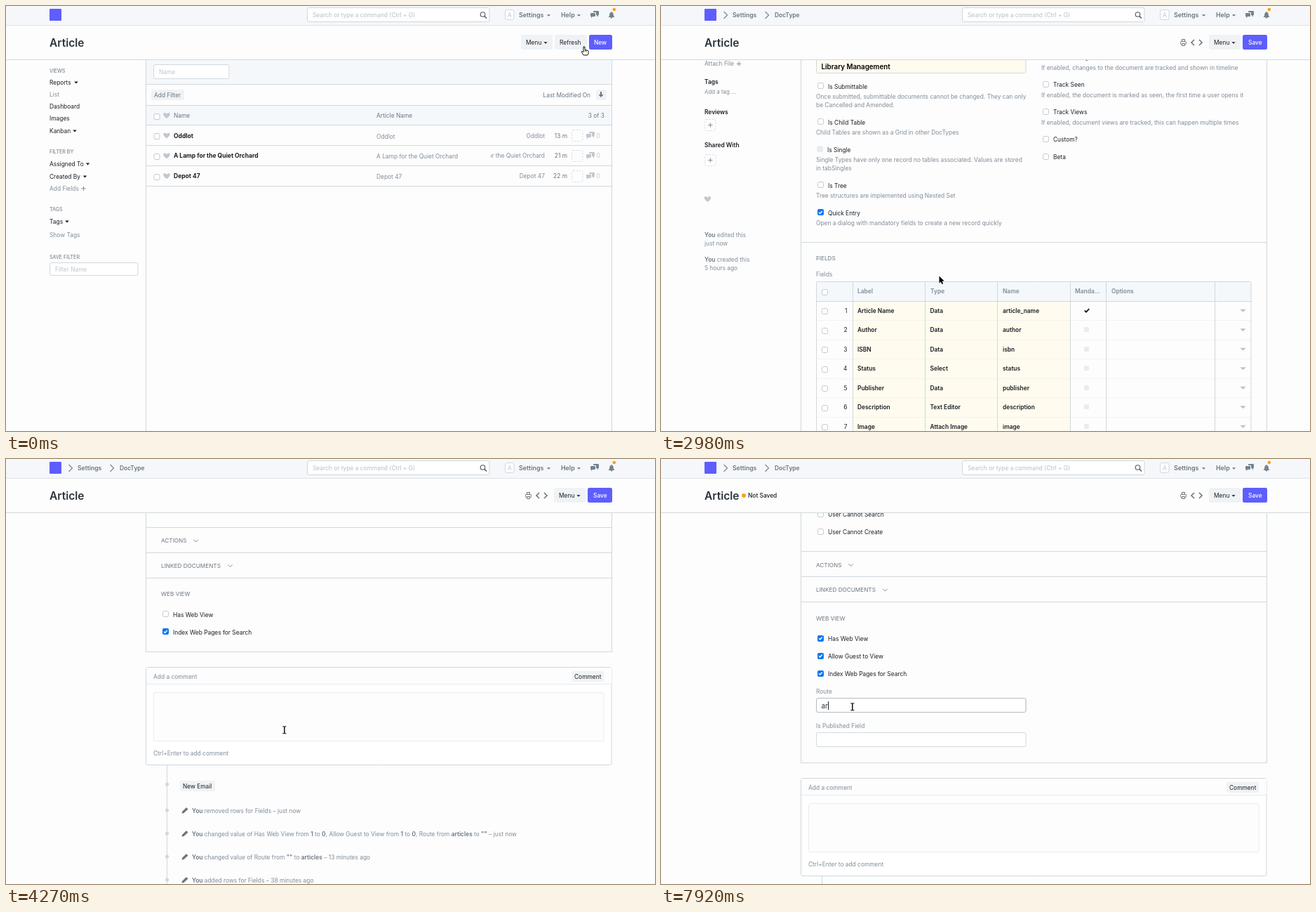
An HTML page with a canvas for the animation above (8000 ms loop, 925 px wide and 605 px high).

```html
<!DOCTYPE html>
<html lang="en">
<head>
<meta charset="utf-8">
<title>Article form</title>
<style>
html, body { margin: 0; width: 100%; height: 100%; overflow: hidden; background: #fdfdfd }
canvas { display: block; width: 925px; height: 605px }
</style>
</head>
<body>
<canvas id="stage" width="925" height="605"></canvas>
<script>
const g = document.getElementById('stage').getContext('2d');
const LOOP = 8000;
const DARK = '#1a1e23', MUTED = '#7f8c99', MID = '#6a7580', FAINT = '#bfc7ce', LINE = '#d1d8dd',
  PANEL = '#f5f8fb', BUTTON = '#eff3f6', PAGE = '#fdfdfd', BLUE = '#5e5eff', YELLOW = '#fffbef', ORANGE = '#ffa00a';
let oy = 0; // vertical offset of the layer being drawn

// ---- time ----
const bursts = [[120, 120, 1], [270, 960, 7], [1080, 1610, 6], [1940, 2270, 4], [2420, 2650, 3], [2890, 3690, 8],
  [3810, 4270, 5], [4620, 5330, 7], [5450, 5560, 2], [5920, 6270, 4], [6510, 6510, 1], [6750, 7220, 5],
  [7570, 7570, 1], [7800, 7920, 2]];
const ticks = [0];
for (const [a, b, n] of bursts)
  for (let i = 0; i < n; i++) ticks.push(Math.floor(a + (n > 1 ? (b - a) * i / (n - 1) : 0)));

const scrollKeys = [[2780, 0], [3000, 190], [3347, 655.5], [3575, 870], [3810, 1024], [4040, 1230], [4270, 1368.5],
  [4620, 1368.5], [4860, 1334]];
const pointerKeys = [[0, 824, 58], [119, 824, 58], [120, 776, 49], [500, 776, 49], [960, 700, 306], [1080, 700, 306],
  [1610, 511, 257], [2330, 511, 257], [2650, 396, 385], [4500, 396, 385], [5330, 260, 251], [5900, 260, 251],
  [6153, 285, 272], [6270, 282, 280], [6640, 282, 280], [6870, 287, 301], [7100, 272, 350], [7220, 272, 352]];

function at(keys, t) {
  const i = keys.findIndex(k => k[0] > t);
  if (i === 0) return keys[0].slice(1);
  if (i < 0) return keys[keys.length - 1].slice(1);
  const a = keys[i - 1], b = keys[i], u = (t - a[0]) / (b[0] - a[0]);
  return a.slice(1).map((v, j) => v + (b[j + 1] - v) * u);
}

// ---- drawing helpers; y of text is the middle of its capitals ----
function text(s, x, y, color = DARK, weight = 400, size = 8.4, align = 'left') {
  g.font = `${weight} ${size}px Inter, sans-serif`;
  g.textAlign = align;
  g.fillStyle = color;
  g.fillText(s, x, y + oy + size * .36);
  return g.measureText(s).width;
}
// Parts between asterisks are bold.
function rich(s, x, y) {
  s.split('*').forEach((part, i) => x += text(part, x, y, i % 2 ? MID : MUTED, i % 2 ? 600 : 400));
}
function fill(x1, y1, x2, y2, color, r = 0) {
  g.fillStyle = color;
  g.beginPath();
  g.roundRect(x1, Math.floor(y1 + oy), x2 - x1, Math.round(y2 - y1), r);
  g.fill();
}
function box(x1, y1, x2, y2, bg = '#fff', border = LINE, r = 2.5, dash = []) {
  g.beginPath();
  g.roundRect(x1 + .5, Math.floor(y1 + oy) + .5, x2 - x1 - .5, Math.round(y2 - y1), r);
  if (bg) { g.fillStyle = bg; g.fill(); }
  g.strokeStyle = border;
  g.lineWidth = 1;
  g.setLineDash(dash);
  g.stroke();
  g.setLineDash([]);
}
function hline(y, x1 = 199, x2 = 864, color = LINE) { fill(x1, y, x2, y + 1, color); }
function vline(x, y1, y2, color = LINE) { fill(x, y1, x + 1, y2, color); }
function path(points, x, y, stroke, width = 1.2, bg, close) {
  g.beginPath();
  for (let i = 0; i < points.length; i += 2) g.lineTo(x + points[i], y + oy + points[i + 1]);
  if (close) g.closePath();
  if (bg) { g.fillStyle = bg; g.fill(); }
  if (stroke) { g.strokeStyle = stroke; g.lineWidth = width; g.stroke(); }
}
function dot(x, y, r, color) {
  g.fillStyle = color;
  g.beginPath();
  g.arc(x, y + oy, r, 0, 7);
  g.fill();
}
const caret = (x, y, color = DARK, r = 3) => path([-r, -r / 2, r, -r / 2, 0, r / 2], x, y, null, 0, color);
const chevronDown = (x, y, color = MUTED) => path([-3.2, -1.6, 0, 1.6, 3.2, -1.6], x, y, color, 1);
const chevron = (x, y, h, dir, color, w) => path([-h / 2 * dir, -h, h / 2 * dir, 0, -h / 2 * dir, h], x, y, color, w);
const tick = (x, y, color = DARK, s = 1, w = 1.9) => path([-3.2 * s, 0, -1 * s, 2.2 * s, 3.2 * s, -2.4 * s], x, y, color, w);
function plus(x, y, color = MUTED) {
  path([-3.2, 0, 3.2, 0], x, y, color, 1);
  path([0, -3.2, 0, 3.2], x, y, color, 1);
}
function button(x1, y1, x2, y2, label, tx, color = DARK, bg = BUTTON, weight = 400) {
  fill(x1, y1, x2, y2, bg, 2.5);
  text(label, tx, (y1 + y2) / 2, color, weight);
}
function checkbox(x, y, on) {
  if (on) {
    fill(x - 4, y - 4, x + 5, y + 5, '#0b78f0', 2);
    tick(x + .4, y + .3, '#fff', .75, 1.3);
  } else box(x - 4, y - 4, x + 4.5, y + 4, '#fff', '#c4c9ce', 2);
}
function check(label, x, y, on) {
  checkbox(x + 6, y - 1, on);
  text(label, x + 17, y);
}
function section(label, y, chevX) {
  text(label, 221, y, MID, 400, 8.2);
  if (chevX) chevronDown(chevX, y);
}
function input(label, x, y, h = 20) { // y is the top edge
  text(label, x, y - 9.5, MUTED);
  box(x, y, x + 299, y + h);
}
function heart(x, y, color = '#c0c8d0') {
  y += oy;
  g.fillStyle = color;
  g.beginPath();
  g.moveTo(x, y + 4);
  g.bezierCurveTo(x - 9, y - 2, x - 3, y - 6.5, x, y - 2.2);
  g.bezierCurveTo(x + 3, y - 6.5, x + 9, y - 2, x, y + 4);
  g.fill();
}
function chat(x, y, color) {
  fill(x - 2, y - 5, x + 6, y + 1, color, 1);
  path([2, 0, 5, 0, 5, 3.5], x, y, null, 0, color);
  fill(x - 6, y - 3, x + 2, y + 3, PAGE, 1);
  fill(x - 6, y - 2, x + 1, y + 3, color, 1);
  path([-5, 2, -2, 2, -5, 5], x, y, null, 0, color);
}

// ---- shared chrome ----
function navbar(form) {
  fill(0, 0, 925, 27, '#f5f7fa');
  hline(27, 0, 925, '#dfe4e8');
  fill(62, 4, 79, 21, BLUE, 1);
  if (form) {
    chevron(92, 13, 5, 1, MUTED, 1.3);
    text('Settings', 102, 13, MID, 600, 8.6);
    chevron(151, 13, 5, 1, MUTED, 1.3);
    text('DocType', 162, 13, MID, 600);
  }
  box(429, 2, 689, 22);
  text('Search or type a command (Ctrl + G)', 437, 13, '#b6bfc8');
  g.strokeStyle = '#4f565d';
  g.lineWidth = 1.1;
  g.beginPath();
  g.arc(679.5, 12, 3.3, 0, 7);
  g.stroke();
  path([2, 2.5, 5, 5.5], 680, 12, '#4f565d', 1.5);
  box(711, 5, 724, 19);
  text('A', 718, 13, FAINT, 400, 8.4, 'center');
  text('Settings', 731, 13, MID, 600, 8.9);
  caret(773.5, 13.5, MID, 2.6);
  text('Help', 791, 13, MID, 600, 8.9);
  caret(816.5, 13.5, MID, 2.6);
  chat(839, 12, '#75828f');
  path([-4.5, 3, -3, 1, -2.7, -2, -1, -4.5, 1, -4.5, 2.7, -2, 3, 1, 4.5, 3], 863, 13, null, 0, '#75828f');
  dot(863, 16.3, 1.3, '#75828f');
  dot(866.8, 5, 2.3, ORANGE);
}
function pageHead(form, unsaved) {
  fill(0, 28, 925, 76, PAGE);
  hline(76, 0, 925);
  text('Article', 62, 52, '#2b333b', 600, 15.5);
  if (unsaved) {
    dot(118, 52, 2.9, ORANGE);
    text('Not Saved', 124, 52, DARK, 500);
  }
  const x = form ? 781 : 734;
  button(x, 41, x + 45, 62, 'Menu', x + 7);
  caret(x + 35, 52.5, DARK, 2.6);
  if (form) {
    box(740, 50, 748.5, 54, PAGE, MID, 1);
    box(742, 47, 746.5, 50, PAGE, MID, 0);
    box(742, 53, 746.5, 56, PAGE, MID, 0);
    chevron(758, 52, 4, -1, MID, 1.6);
    chevron(769, 52, 4, 1, MID, 1.6);
    button(829, 41, 864, 62, 'Save', 837, '#fff', BLUE, 500);
  } else {
    button(782, 41, 828, 62, 'Refresh', 789);
    button(831, 41, 864, 62, 'New', 838, '#fff', BLUE, 500);
  }
}

// ---- list page ----
const articles = [['Oddlot', '13 m'], ['A Lamp for the Quiet Orchard', '21 m'], ['Depot 47', '22 m']];
function listPage(menuOpen) {
  for (const [s, y] of [['VIEWS', 92], ['FILTER BY', 207.5], ['TAGS', 289.5], ['SAVE FILTER', 357]])
    text(s, 62, y, MID, 400, 7.1);
  for (const [s, y, cx] of [['Reports', 108.5, 100], ['Dashboard', 142.5], ['Images', 159.5], ['Kanban', 177.5, 98],
    ['Assigned To', 224.5, 116.5], ['Created By', 242.5, 112.5], ['Tags', 306.5, 87]]) {
    text(s, 62, y);
    if (cx) caret(cx, y + .5, DARK, 2.8);
  }
  for (const [s, y] of [['List', 126], ['Add Fields', 259.5], ['Show Tags', 325.5]]) text(s, 62, y, MUTED);
  plus(110.5, 259.8);
  box(62, 365, 188, 383);
  text('Filter Name', 70, 375, FAINT);

  fill(200, 77, 863, 111, PANEL);
  fill(200, 142, 863, 169, PANEL);
  vline(199, 77, 605);
  vline(863, 77, 605);
  [111, 141, 169, 198, 227, 256].forEach(y => hline(y));
  box(210, 83, 318, 103);
  text('Name', 218, 94, FAINT);
  button(207, 119, 254, 134, 'Add Filter', 211, MID);
  text('Last Modified On', 833, 127, MID, 400, 8.4, 'right');
  fill(841, 119, 856, 134, BUTTON, 2.5);
  path([0, -4, 0, 1], 848, 126, MID, 2);
  path([-3.5, 0, 3.5, 0, 0, 4], 848, 126, null, 0, MID);

  checkbox(214.5, 157);
  heart(229, 156);
  text('Name', 239, 156, MID);
  text('Article Name', 528, 156, MID);
  text('3 of 3', 853, 156, MID, 400, 8.4, 'right');
  articles.forEach(([name, age], i) => {
    const y = 184.5 + 28.8 * i;
    checkbox(214.5, y + 1);
    heart(229, y);
    text(name, 239, y, DARK, 700, 8.5);
    text(name, 528, y + 1, MUTED);
    g.save();
    g.beginPath();
    g.rect(691, y - 10, 80, 20);
    g.clip();
    text(name, 768, y, MUTED, 400, 8.4, 'right');
    g.restore();
    text(age, 800, y, MID, 400, 8.4, 'right');
    box(806, y - 8, 822, y + 8, null, LINE, 2.5, [2, 2]);
    chat(833, y, '#c0c8d0');
    text('0', 841.5, y, FAINT);
  });
  if (!menuOpen) return;
  g.save();
  g.shadowColor = 'rgba(0,0,0,.15)';
  g.shadowBlur = 5;
  g.shadowOffsetY = 2;
  box(637, 63, 779, 325);
  g.restore();
  ['Import', 'Add to Desktop', 'User Permissions', 'Role Permissions Manager', 'Customize', 'Toggle Sidebar',
    'Share URL', 'Edit DocType'].forEach((s, i) => text(s, 647, 80 + 32.6 * i));
}

// ---- form page ----
function formSidebar() {
  text('Comments', 62, 93);
  fill(173, 86, 188, 100, BUTTON, 7);
  text('0', 181, 93, DARK, 400, 8.4, 'center');
  for (const [s, y] of [['Assigned To', 118.5], ['Attachments', 160.5], ['Tags', 202.5], ['Reviews', 246], ['Shared With', 293]])
    text(s, 62, y, DARK, 600);
  text('Assign', 62, 135, MUTED);
  plus(95.5, 135.3);
  text('Attach File', 62, 177, MUTED);
  plus(111, 177.3);
  text('Add a tag ...', 62, 217, MUTED, 400, 7.9);
  for (const y of [256, 306]) {
    box(62, y, 78, y + 16, null, LINE, 2.5, [2, 2]);
    plus(70.3, y + 8.5);
  }
  heart(66.5, 370);
  rich('*You* edited this', 62, 421);
  rich('just now', 62, 433);
  rich('*You* created this', 62, 455.5);
  rich('5 hours ago', 62, 467.5);
}

function grid(cols, top, head, rowH, rows, bottom, yellowTo, rule) {
  const end = top + head + rowH * rows;
  fill(221, top, 842, top + head, PANEL);
  fill(273, top + head, yellowTo, end, YELLOW);
  for (let i = 1; i < rows; i++) hline(top + head + rowH * i, 221, 842, rule);
  hline(top + head, 221, 842);
  hline(end, 221, 842);
  cols.forEach(x => vline(x, top, end));
  box(221, top, 841, bottom, null, LINE, 1);
  checkbox(233, top + head / 2 + 1);
  for (let i = 0; i < rows; i++) {
    const y = top + head + rowH * (i + .5);
    checkbox(233, y + 1);
    text(i + 1, 265.5, y, DARK, 400, 8.4, 'right');
    caret(829.5, y, '#b9c1c9', 4);
  }
  button(232, bottom - 23, 275, bottom - 8, 'Add Row', 236);
}
function flag(x, y, on) {
  if (on) tick(x, y);
  else fill(x - 4, y - 3.5, x + 3, y + 3.5, '#e9ecef', 1.5);
}

function settingsBlock() {
  button(777, 83, 852, 98, 'Go to Article List', 781);
  section('DASHBOARD', 125, 285.5);
  text('Module', 221, 160.5, MUTED);
  box(221, 170, 520, 190, YELLOW);
  text('Library Management', 228.5, 181, '#000', 600, 9.8);
  const left = [['Is Submittable', 209.5, 'Once submitted, submittable documents cannot be changed. They can only', 'be Cancelled and Amended.'],
    ['Is Child Table', 260.5, 'Child Tables are shown as a Grid in other DocTypes'],
    ['Is Single', 299.5, 'Single Types have only one record no tables associated. Values are stored', 'in tabSingles'],
    ['Is Tree', 350.5, 'Tree structures are implemented using Nested Set'],
    ['Quick Entry', 389.5, 'Open a dialog with mandatory fields to create a new record quickly']];
  for (const [label, y, ...help] of left) {
    if (label === 'Is Single') {
      fill(222, y - 5, 231, y + 4, '#e9ecef', 2);
      text(label, 237, y);
    } else check(label, 221, y, label === 'Quick Entry');
    help.forEach((s, i) => text(s, 221, y + 14.8 + 12 * i, MUTED));
  }
  const right = [['Track Changes', 168, 'If enabled, changes to the document are tracked and shown in timeline'],
    ['Track Seen', 207, 'If enabled, the document is marked as seen, the first time a user opens it'],
    ['Track Views', 246, 'If enabled, document views are tracked, this can happen multiple times'],
    ['Custom?', 285, ''], ['Beta', 310, '']];
  right.forEach(([label, y, help], i) => {
    check(label, 542, y, i === 0);
    text(help, 542, y + 14.6, MUTED);
  });

  section('FIELDS', 454.5);
  text('Fields', 221, 477, MUTED);
  const fields = [['Article Name', 'Data', 'article_name'], ['Author', 'Data', 'author'], ['ISBN', 'Data', 'isbn'],
    ['Status', 'Select', 'status'], ['Publisher', 'Data', 'publisher'], ['Description', 'Text Editor', 'description'],
    ['Image', 'Attach Image', 'image']];
  grid([273, 376, 479, 583, 634, 789], 487, 28, 27.5, fields.length, 737, 583, '#f3f3ee');
  [['Label', 280], ['Type', 384], ['Name', 487], ['Manda...', 590], ['Options', 642]]
    .forEach(([s, x]) => text(s, x, 500.5, MUTED, 600));
  fields.forEach((row, i) => {
    const y = 528.5 + 27.5 * i;
    row.forEach((s, j) => text(s, 280 + 103.5 * j, y, DARK, 600));
    flag(607, y, i === 0);
  });
}

function namingBlock() {
  section('NAMING', 126.5);
  input('Auto Name', 221, 159);
  text('field:article_name', 228.5, 169.5, '#2b333b', 400, 9.8);
  text('Naming Options:', 221, 188, MUTED);
  ['1|*field:[fieldname]* - By Field', '2|*naming_series:* - By Naming Series (field called naming_series must', '|be present',
    '3|*Prompt* - Prompt user for a name', '4|*[series]* - Series by prefix (separated by a dot); for example', '|PRE.#####',
    '5|*format:EXAMPLE-{MM}morewords{fieldname1}-{fieldname2}-*', '|*{#####}* - Replace all braced words (fieldnames, date words (DD,',
    '|MM, YY), series) with their value. Outside braces, any characters', '|can be used.'].forEach((s, i) => {
    const [n, body] = s.split('|'), y = 200 + 12 * i;
    if (n) text(n + '.', 246.5, y, MUTED, 400, 8.4, 'right');
    rich(body, 249, y);
  });
  input('Name Case', 221, 341);
  chevronDown(508.5, 352, MID);
  input('Description', 542, 159, 104);
  input('Documentation Link', 542, 292);
  text('URL for documentation or help', 542, 322, MUTED);
  section('FORM SETTINGS', 402.5, 301);
  section('VIEW SETTINGS', 438.5, 298);
}

function permissionBlock() {
  section('EMAIL SETTINGS', 106, 302.5);
  section('PERMISSION RULES', 146);
  text('Permissions', 221, 168.5, MUTED);
  grid([273, 376, 479, 531, 583, 634, 686, 737, 789], 179, 27.5, 28.2, 3, 321, 376, LINE);
  text('Role', 280, 192, MUTED, 600);
  text('Level', 472, 192, MUTED, 600, 8.4, 'right');
  ['Read', 'Write', 'Create', 'Delete', 'Submit', 'Cancel']
    .forEach((s, i) => text(s, 505 + 51.6 * i, 192, MUTED, 600, 8.4, 'center'));
  [['System Manager', 4], ['Librarian', 4], ['Library Member', 1]].forEach(([role, granted], i) => {
    const y = 220 + 28.2 * i;
    text(role, 280, y, DARK, 600);
    text('0', 472, y, DARK, 400, 8.4, 'right');
    for (let j = 0; j < 6; j++) flag(504.3 + 51.6 * j, y, j < granted);
  });
  input('Restrict To Domain', 221, 349);
  check('User Cannot Search', 221, 389);
  check('User Cannot Create', 221, 414);
  section('ACTIONS', 461, 270.5);
  section('LINKED DOCUMENTS', 496.5, 319.5);
}

function webBlock(t, open) {
  section('WEB VIEW', 537);
  check('Has Web View', 221, 566, open);
  check('Index Web Pages for Search', 221, open ? 616 : 591, true);
  if (!open) return;
  check('Allow Guest to View', 221, 591, t >= 6510);
  input('Route', 221, 650);
  input('Is Published Field', 221, 699);
  if (t < 7220) return;
  box(221, 650, 520, 670, '#fff', '#b4bcc4');
  const w = text(t < 7570 ? '' : t < 7800 ? 'a' : 'ar', 228.5, 661.5, '#2b333b', 400, 9.8);
  vline(Math.round(228.5 + w), 655, 667, '#222');
}

function commentBlock() {
  box(199, 296, 863, 435);
  fill(200, 297, 863, 320, PAGE);
  hline(320, 200, 863, '#e6eaee');
  text('Add a comment', 210, 309.5, MUTED);
  button(806, 302, 852, 317, 'Comment', 810);
  box(210, 332, 852, 401, '#fdfdfd', '#e8ecef');
  text('Ctrl+Enter to add comment', 210, 419, MUTED);
  vline(229, 436, 700);
  [463, 500, 533, 566, 599].forEach(y => dot(229.5, y, 2.6, LINE));
  button(248, 458, 298, 473, 'New Email', 252);
  ['*You* removed rows for Fields – just now',
    '*You* changed value of Has Web View from *1* to *0*, Allow Guest to View from *1* to *0*, Route from *articles* to *""* – just now',
    '*You* changed value of Route from *""* to *articles* – 13 minutes ago',
    '*You* added rows for Fields – 38 minutes ago'].forEach((s, i) => {
    const y = 500.5 + 33 * i;
    path([-4.5, 4, -4, 1.5, 2, -4.5, 4.5, -2, -1.5, 3.5], 255, y, null, 0, MID, true);
    rich(s, 265, y);
  });
}

function formPage(t) {
  const scroll = at(scrollKeys, t)[0], open = t >= 5450, end = open ? 742 : 618.5;
  const layer = (base, draw) => { oy = base - scroll; draw(); };
  g.save();
  g.beginPath();
  g.rect(0, 77, 925, 528);
  g.clip();
  layer(0, () => {
    vline(199, 76, 1024 + end);
    vline(863, 76, 1024 + end);
    [105, 141, 431].forEach(y => hline(y));
    formSidebar();
    settingsBlock();
  });
  layer(655.5, () => {
    [103, 383, 419, 455].forEach(y => hline(y));
    namingBlock();
  });
  layer(1024, () => {
    [122.5, 441.5, 477.5, 513.5, end].forEach(y => hline(y));
    permissionBlock();
    webBlock(t, open);
  });
  layer(1368.5 + (open ? 123.5 : 0), commentBlock);
  oy = 0;
  g.restore();
}

// ---- pointer ----
const ARROW = [0, 0, 0, 10, 2.3, 7.9, 3.9, 11.6, 5.7, 10.8, 4.1, 7.3, 7.2, 7.1];
function pointer(t) {
  const [x, y] = at(pointerKeys, t);
  g.lineJoin = 'round';
  if (t < 1186) {
    path([-1, 0, .8, 0, 1.3, 4.5, 5, 5.3, 6.3, 6.5, 6, 9.5, 4.8, 12, -.8, 12, -3.8, 7.5, -3.2, 6.3, -1, 7.6],
      x, y, '#111', 1, '#fff', true);
    path([1.3, 4.8, 1.5, 7], x, y, '#111', .8);
    path([3.3, 5.2, 3.4, 7], x, y, '#111', .8);
  } else if ((t >= 4150 && t < 4800) || t >= 6980) {
    for (const [color, w] of [['#fff', 2.6], ['#111', 1.1]])
      for (const side of [-1, 1])
        path([2.6 * side, -5, .8 * side, -5, 0, -4, 0, 4, .8 * side, 5, 2.6 * side, 5], x + .8, y + .8, color, w);
  } else {
    path(ARROW, x + .5, y - .5, '#fff', 1.4, '#fff', true);
    path(ARROW, x + .5, y - .5, null, 0, '#000', true);
  }
  g.lineJoin = 'miter';
}

function draw(t) {
  const form = t >= 1940;
  fill(0, 0, 925, 605, PAGE);
  navbar(form);
  pageHead(form, t >= 5450);
  if (form) formPage(t);
  else listPage(t >= 385 && t < 1186);
  pointer(t);
}

const start = performance.now();
function frame() {
  const t = (performance.now() - start) % LOOP;
  draw(ticks.filter(k => k <= t + 12).pop());
  requestAnimationFrame(frame);
}
frame();
</script>
</body>
</html>
```
